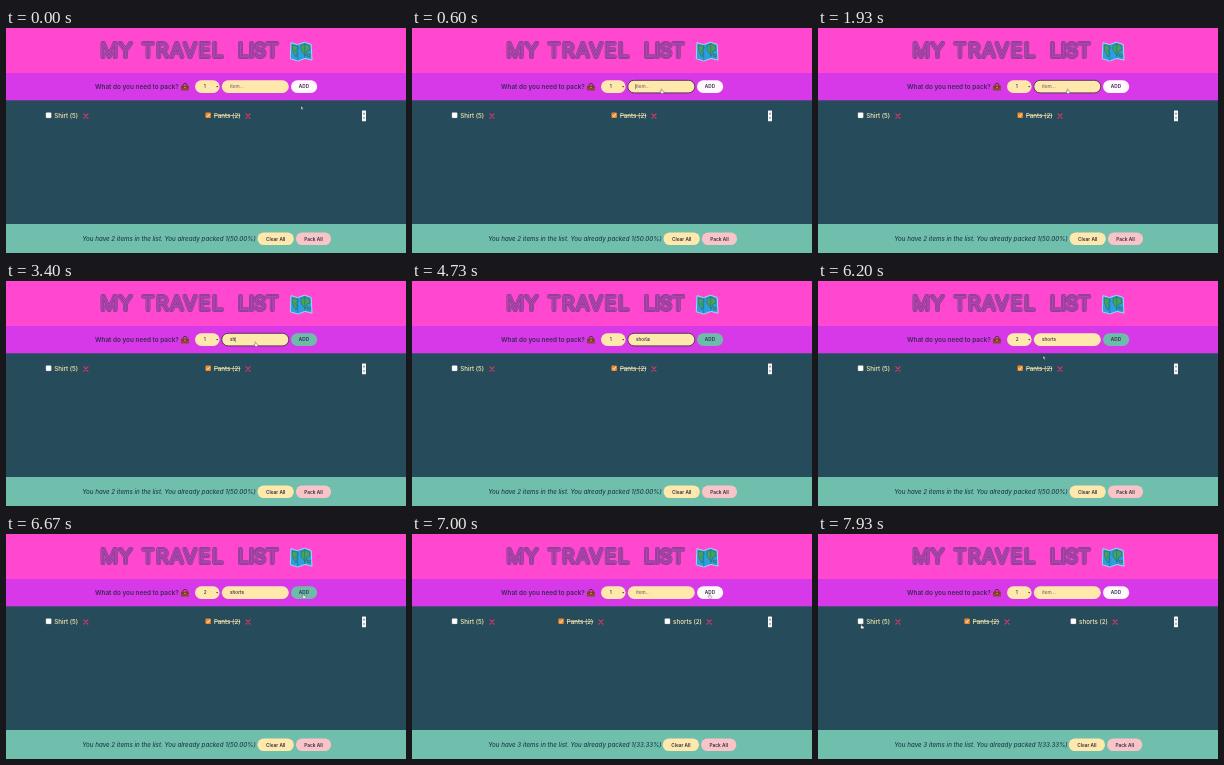
An HTML page for the animation above (8 s loop, 400x225 px).

```html
<!DOCTYPE html>
<html lang="en">
<head>
<meta charset="utf-8">
<title>My travel list</title>
<style>
  html, body { margin: 0; width: 100%; height: 100%; overflow: hidden; background: #264b5a; }
  svg { display: block; width: 100%; height: 100%; }
  text { font-family: Inter, "Open Sans", sans-serif; font-weight: 500; fill: #302d45; white-space: pre; }
  .title text { font-size: 19.2px; font-weight: 200; stroke-linejoin: round; }
  .label { font-size: 6.4px; font-weight: 600; fill: #3b2856; }
  .small { font-size: 4.7px; }
  .button { font-size: 4.75px; font-weight: 600; text-anchor: middle; }
  .item { font-size: 6.2px; fill: #ffebb3; }
  .stats { font-size: 6.2px; font-style: italic; text-anchor: middle; fill: #203f4b; }
</style>
</head>
<body>
<svg viewBox="0 0 400 225">
  <rect width="400" height="225" fill="#264b5a"/>
  <rect width="400" height="45" fill="#ff48cf"/>
  <rect y="45" width="400" height="27.3" fill="#d739e8"/>
  <rect y="196" width="400" height="29" fill="#70bfad"/>

  <g id="title" class="title"></g>

  <g id="map" stroke-linejoin="round">
    <path d="M285 14.6L291.5 16.6L298.5 14.2L305.2 16.4L306 32.2L299 30.4L292 33L284.3 30.8Z" fill="#2b9fdf" stroke="#a8dff0" stroke-width=".9"/>
    <path d="M286 17L291 18L292.5 20L289.5 22.5L291.5 25L290 29L288 25.5L286.5 22Z M295 17.5L299 16L303.5 18L304 22L301 23L299.5 28L297 25L295 22Z M301.5 26L304.3 26.5L304 29L301.5 28.5Z" fill="#45a456" stroke="#235f75" stroke-width=".5"/>
    <path d="M291.7 17V32.5M298.7 15V30" stroke="#1b6da5" stroke-width=".6"/>
  </g>

  <text class="label" x="89" y="61.2">What do you need to pack?</text>
  <g id="bag">
    <path d="M177 58V56.5Q179 53.8 181 56.5V58" fill="none" stroke="#5d2f27" stroke-width="1"/>
    <path d="M175.3 57.4H182.5L183 62.5H174.8Z" fill="#8b4a2f"/>
    <path d="M175.2 59H182.8" stroke="#562c26" stroke-width=".8"/>
    <circle cx="179" cy="59.4" r=".7" fill="#e5b04f"/>
  </g>

  <rect x="189" y="52.3" width="24.6" height="12.6" rx="6.3" fill="#ffe8ac"/>
  <text id="amount" class="small" x="197.8" y="60.4"></text>
  <path d="M210.1 58.1H212.3L211.2 59.5Z" fill="#4b3a4b"/>
  <rect id="field" x="215.8" y="52.3" width="67" height="12.6" rx="6.3" fill="#ffe8ac" stroke="#45314d"/>
  <text id="entry" class="small" x="224" y="60.4"></text>
  <path id="caret" stroke="#302d45" stroke-width=".5"/>
  <rect id="addBox" x="285" y="52.3" width="26.2" height="12.6" rx="6.3"/>
  <text class="button" x="298" y="60.4">ADD</text>

  <g id="list"></g>
  <rect x="356" y="82.4" width="4" height="10.8" rx=".5" fill="#f5f6f7"/>
  <path d="M357 86.2L358 84.5L359 86.2ZM357 89.4L358 91.1L359 89.4Z" fill="#555"/>

  <text id="stats" class="stats" x="163" y="212.9"></text>
  <g id="actions">
    <rect x="251.5" y="204.4" width="36.3" height="12.6" rx="6.3" fill="#ffe8ac"/>
    <text class="button" x="269.7" y="212.5">Clear All</text>
    <rect x="289.9" y="204.4" width="35.2" height="12.6" rx="6.3" fill="#f8c4c7"/>
    <text class="button" x="307.5" y="212.5">Pack All</text>
  </g>

  <g id="cursor" stroke="#333" stroke-width=".35" stroke-linejoin="round" fill="#fff">
    <path id="arrow" d="M0 0V3.2L.8 2.5L1.4 3.8L2 3.5L1.4 2.3H2.4Z"/>
    <path id="hand" d="M0 .2Q.5 -.4 .9 .2V1.8L2.6 2.2Q3 2.4 2.8 3.2L2.4 4.4H.5L-.9 2.7Q-.8 2.1 0 2.6Z"/>
  </g>
</svg>
<script>
const LOOP = 8000;
const $ = id => document.getElementById(id);

// Times at which each value takes over
const entrySteps = [[0, ""], [3270, "s"], [3360, "sh"], [4000, "sho"], [4130, "short"], [4200, "shorts"], [6830, ""]];
const amountSteps = [[0, 1], [5800, 2], [6830, 1]];
const caretSteps = [[0, 0], [340, 1], [870, 0], [1400, 1], [1930, 0], [2470, 1], [3000, 0], [3270, 1], [4730, 0]];
const focusSteps = [[0, 0], [340, 1], [5230, 0]];
const addedSteps = [[0, 0], [6830, 1]];
const handSteps = [[0, 0], [480, 1], [4680, 0], [4980, 1], [5450, 0], [6560, 1], [7100, 0], [7720, 1]];

const cursorPath = [
  [0, 295, 78.3], [70, 295, 78.3], [600, 249, 61], [4660, 249, 61], [4730, 234, 56],
  [5000, 209, 58], [5200, 209, 58], [5330, 205, 60], [5600, 205, 87], [5800, 205, 87],
  [6180, 225, 75], [6250, 226, 74.5], [6650, 297, 60], [7050, 297, 60],
  [7730, 46, 91], [7860, 43, 90.3], [LOOP, 43, 90.3]
];

const stepAt = (steps, t) => steps.findLast(([start]) => start <= t)[1];

function pointAt(t) {
  const i = cursorPath.findIndex(([end]) => end > t);
  const [t0, x0, y0] = cursorPath[i - 1], [t1, x1, y1] = cursorPath[i];
  const u = (t - t0) / (t1 - t0), k = u * u * (3 - 2 * u);
  return [x0 + (x1 - x0) * k, y0 + (y1 - y0) * k];
}

// Nested outlines give the striped display lettering
const words = [["MY", 94.5, 1.5], ["TRAVEL", 136, 2.2], ["LIST", 232, .2]];
const stripes = [[4, "#79408e"], [2.7, "#d646c0"], [1.5, "#79408e"], [.2, "#bd45b1"]];
$("title").innerHTML = stripes.map(([width, color]) => words.map(([word, x, gap]) =>
  `<text x="${x}" y="29" letter-spacing="${gap}" stroke="${color}" stroke-width="${width}" style="fill:${color}">${word}</text>`
).join("")).join("");

function itemMarkup(x, label, width, packed) {
  const box = packed
    ? `<rect x="${x}" y="84.6" width="5.4" height="5.4" rx=".8" fill="#ef8c2d"/>
       <path d="M${x + 1.1} 87.3l1.2 1.3 2-2.7" fill="none" stroke="#fff" stroke-width=".8"/>`
    : `<rect x="${x}" y="84.6" width="5.4" height="5.4" rx=".8" fill="#fff" stroke="#8b949a" stroke-width=".3"/>`;
  const strike = packed ? `<path d="M${x + 8.4} 87.5h${width}" stroke="#ffebb3" stroke-width=".6"/>` : "";
  return `${box}<text class="item" x="${x + 8.4}" y="89.5">${label}</text>${strike}
    <path d="M${x + width + 14} 85.8l4 4.4m0-4.4l-4 4.4" stroke="#df356b" stroke-width="1.2" stroke-linecap="round"/>`;
}

let shownAdded = -1;
function showList(added) {
  if (added === shownAdded) return;
  shownAdded = added;
  $("list").innerHTML = itemMarkup(39.9, "Shirt (5)", 24, false)
    + itemMarkup(added ? 146.4 : 199.5, "Pants (2)", 26.5, true)
    + (added ? itemMarkup(252.7, "shorts (2)", 28.5, false) : "");
  $("stats").textContent = added
    ? "You have 3 items in the list. You already packed 1(33.33%)"
    : "You have 2 items in the list. You already packed 1(50.00%)";
  $("actions").setAttribute("transform", `translate(${added ? -.8 : 0} 0)`);
}

function draw(t) {
  const entry = stepAt(entrySteps, t);
  const hand = stepAt(handSteps, t);
  const [x, y] = pointAt(t);
  showList(stepAt(addedSteps, t));
  $("amount").textContent = stepAt(amountSteps, t);
  $("entry").textContent = entry || "item...";
  $("entry").style.fill = entry ? "#302d45" : "#796b68";
  $("field").setAttribute("stroke-width", stepAt(focusSteps, t) ? .9 : 0);
  $("addBox").setAttribute("fill", entry ? "#6dbbaa" : "#fff8fc");
  const caretX = 224 + (entry ? $("entry").getComputedTextLength() : -.4);
  $("caret").setAttribute("d", stepAt(caretSteps, t) ? `M${caretX} 56v5.2` : "");
  $("cursor").setAttribute("transform", `translate(${x} ${y})`);
  $("hand").style.display = hand ? "" : "none";
  $("arrow").style.display = hand ? "none" : "";
}

const start = performance.now();
function tick() {
  draw((performance.now() - start) % LOOP);
  requestAnimationFrame(tick);
}
tick();
</script>
</body>
</html>
```
